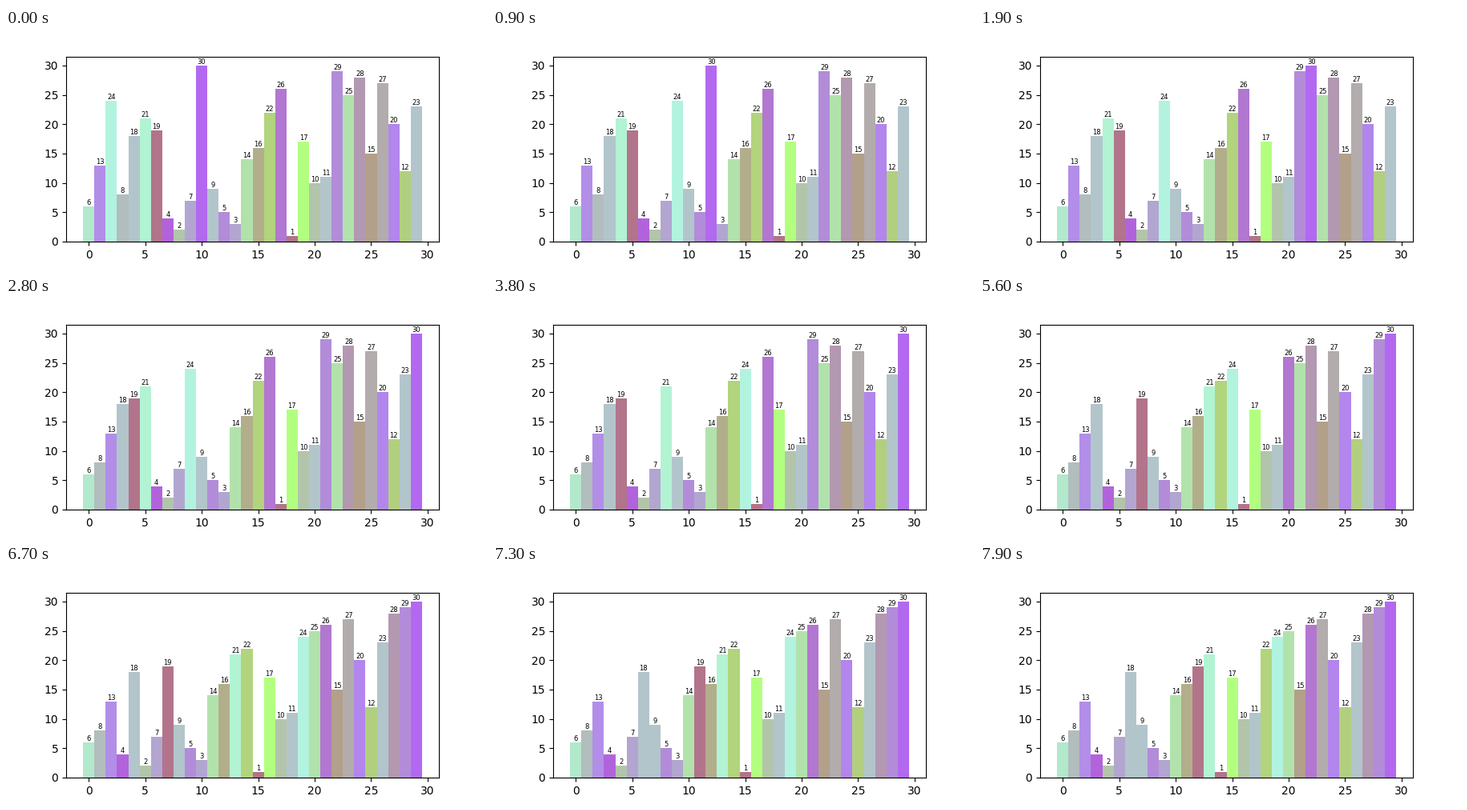
Animation of 600x300 px, one loop 8000 ms. Source, as a matplotlib script:

```python
import matplotlib.pyplot as plt
from matplotlib.animation import FuncAnimation

FRAMES = 80
INTERVAL = 100

START = [6, 13, 24, 8, 18, 21, 19, 4, 2, 7, 30, 9, 5, 3, 14,
         16, 22, 26, 1, 17, 10, 11, 29, 25, 28, 15, 27, 20, 12, 23]

# Each colour and the values that wear it
PALETTE = {
    "#b2c5cb": (9, 11, 18, 23),
    "#b2a6d0": (3, 7),
    "#b2c5ab": (2, 10),
    "#b2e2ab": (14, 25),
    "#b28cd9": (5, 29),
    "#b2748a": (1, 19),
    "#b2e8cb": (6,),
    "#b2bdbd": (8,),
    "#b28ee8": (13,),
    "#b2f3e0": (24,),
    "#b2f3d3": (21,),
    "#b263dc": (4,),
    "#b269f0": (30,),
    "#b2ae8c": (16,),
    "#b2d47c": (22,),
    "#b277d0": (26,),
    "#b2ff80": (17,),
    "#b298b0": (28,),
    "#b2a08a": (15,),
    "#b2acac": (27,),
    "#b286ec": (20,),
    "#b2cf80": (12,),
}
COLOR = {v: c for c, values in PALETTE.items() for v in values}


def bubble_states(values):
    """Yield the list before sorting and after every swap."""
    a = list(values)
    yield a[:]
    for end in range(len(a) - 1, 0, -1):
        for i in range(end):
            if a[i] > a[i + 1]:
                a[i], a[i + 1] = a[i + 1], a[i]
                yield a[:]


states = [s for s, _ in zip(bubble_states(START), range(FRAMES))]

plt.rcParams["font.family"] = "DejaVu Sans"
fig, ax = plt.subplots(figsize=(6, 3), dpi=100)
bars = ax.bar(range(len(START)), START, width=1)
labels = [ax.text(i, v, str(v), fontsize=6, ha="center", va="bottom")
          for i, v in enumerate(START)]
ax.set_xlim(-2, 31)
ax.set_ylim(0, 31.5)


def update(frame):
    for bar, label, v in zip(bars, labels, states[frame]):
        bar.set_height(v)
        bar.set_facecolor(COLOR[v])
        label.set_y(v)
        label.set_text(str(v))
    return [*bars, *labels]


anim = FuncAnimation(fig, update, frames=FRAMES, interval=INTERVAL,
                     repeat=True, repeat_delay=0, blit=False)
plt.show()
```
